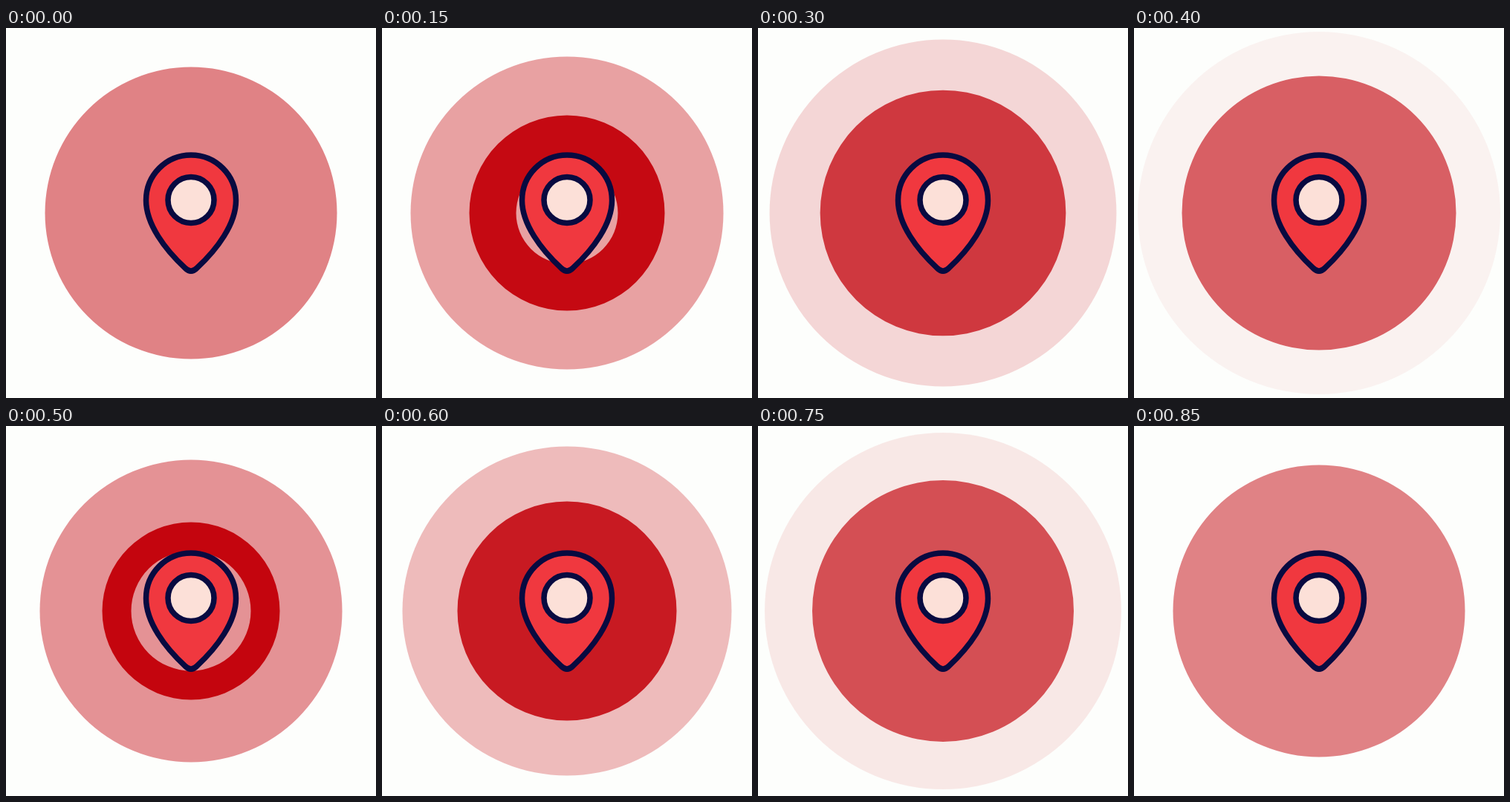
Animation of 498 by 498 pixels, one loop 0.9 s. Source, as an HTML page with a canvas:

```html
<!DOCTYPE html>
<html lang="en">
<head>
<meta charset="utf-8">
<title>Pulsing map pin</title>
<style>
  html, body { margin: 0; width: 100%; height: 100%; overflow: hidden; background: #fdfefc; }
  canvas { display: block; }
</style>
</head>
<body>
<canvas id="stage" width="498" height="498"></canvas>
<script>
const ctx = document.getElementById('stage').getContext('2d');
const LOOP = 900, STEP = 50, GAP = 390;
const CENTER = 249, RING = 100;

// Ripple over its age in ms: [age, half stroke width, opacity]
const RIPPLE = [
  [45, 0, 1], [150, 31.5, .94], [210, 47.5, .86], [250, 56.5, .8],
  [360, 76, .66], [400, 84.5, .606], [460, 96.5, .49], [540, 110.5, .368],
  [600, 121.5, .265], [640, 128, .217], [750, 140, .087], [790, 144, .047],
  [850, 149, 0]
];

const pin = new Path2D(
  'M249 171C215.5 171 188.5 198 188.5 232C188.5 264 214 298 241 323' +
  'Q249 331 257 323C284 298 309.5 264 309.5 232C309.5 198 282.5 171 249 171Z');
const eye = new Path2D();
eye.arc(249, 231.5, 31, 0, Math.PI * 2);

function ripple(age) {
  const i = RIPPLE.findIndex(p => p[0] > age);
  if (i < 1) return;
  const [a, b] = [RIPPLE[i - 1], RIPPLE[i]];
  const k = (age - a[0]) / (b[0] - a[0]);
  const mix = n => a[n] + (b[n] - a[n]) * k;
  const half = mix(1);
  ctx.globalAlpha = mix(2);
  ctx.fillStyle = '#c3000a';
  ctx.beginPath();
  ctx.arc(CENTER, CENTER, RING + half, 0, Math.PI * 2);
  if (half < RING) ctx.arc(CENTER, CENTER, RING - half, Math.PI * 2, 0, true);
  ctx.fill();
  ctx.globalAlpha = 1;
}

function shape(path, fill, width) {
  ctx.fillStyle = fill;
  ctx.strokeStyle = '#080a40';
  ctx.lineWidth = width;
  ctx.fill(path);
  ctx.stroke(path);
}

function draw(now) {
  // The loop opens on the same pose it ends with
  const t = Math.floor(now % LOOP / STEP) * STEP || LOOP - STEP;
  ctx.fillStyle = '#fdfefc';
  ctx.fillRect(0, 0, 498, 498);
  for (const shift of [GAP, 0, -GAP]) ripple(t + shift);
  shape(pin, '#f0383f', 7.5);
  shape(eye, '#fce0d8', 7.5);
  requestAnimationFrame(() => draw(performance.now()));
}
draw(0);
</script>
</body>
</html>
```
